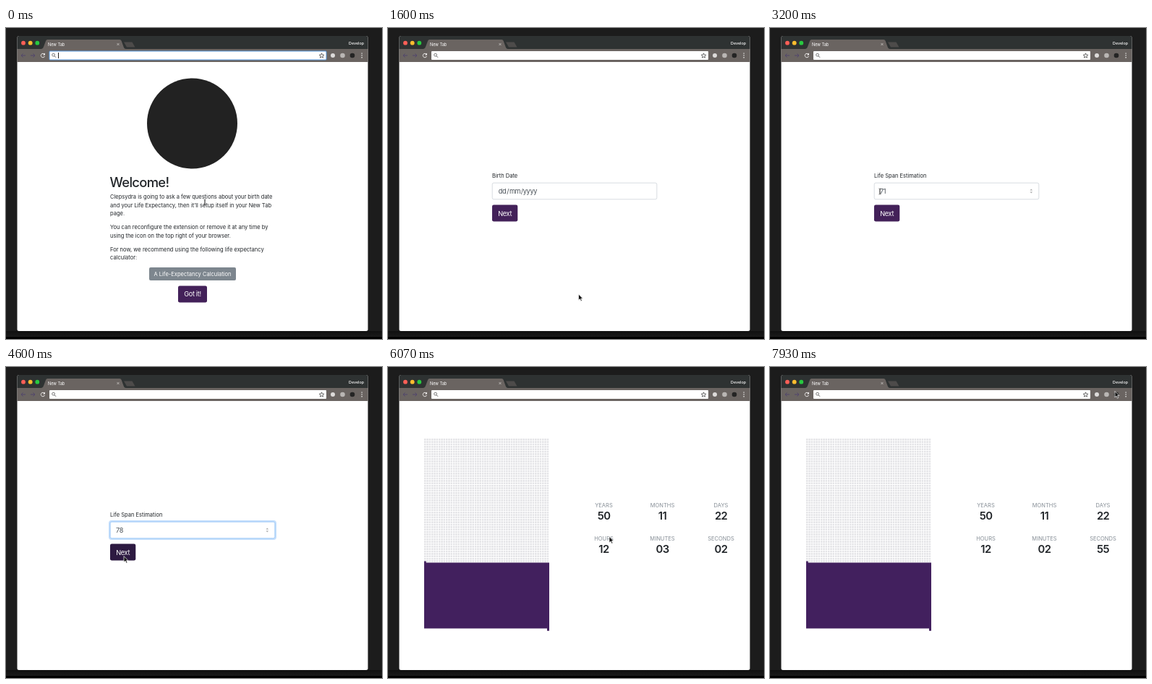
Animation, 520 px wide and 430 px high, one loop 8000 ms. Source, as an HTML page:

```html
<!DOCTYPE html>
<html lang="en">
<head>
<meta charset="utf-8">
<title>New Tab</title>
<style>
html, body { margin: 0; width: 100%; height: 100%; overflow: hidden; background: #1c1c1c; }
svg { display: block; width: 520px; height: 430px; font: 7.54px Inter, "Open Sans", sans-serif; fill: #212529; }
.tiny { font-size: 5.6px; fill: #fff; }
.title { font-size: 18.4px; font-weight: 500; letter-spacing: -.7px; }
.large { font-size: 9.2px; letter-spacing: -.35px; }
.field { fill: #495057; }
.white { fill: #fff; }
.mid { text-anchor: middle; }
.unit { fill: #868e96; }
.count { font-size: 14.8px; font-weight: 600; letter-spacing: -.6px; }
.line { fill: none; stroke-width: 1; }
</style>
</head>
<body>
<svg viewBox="0 0 520 430">
  <defs>
    <linearGradient id="shade" x2="0" y2="1">
      <stop stop-color="#101010"/><stop offset="1" stop-color="#1a1a1a"/>
    </linearGradient>
    <pattern id="cells" x="50" y="99" width="3.327" height="3.365" patternUnits="userSpaceOnUse">
      <rect width="2.5" height="2.5" fill="#e4e4e7"/>
    </pattern>
  </defs>

  <!-- desktop and browser window -->
  <rect width="520" height="430" fill="#1c1c1c"/>
  <rect y="419" width="520" height="8" fill="url(#shade)"/>
  <rect y="427" width="520" height="3" fill="#000"/>
  <rect x="15.5" y="11" width="485" height="408" rx="2.5" fill="#fff"/>
  <path d="M15.5 29V13.500Q15.500 11 18 11H498Q500.500 11 500.500 13.500V29Z" fill="#2e3232"/>
  <path d="M15.500 29H49Q51 29 52 26L55 18Q55.700 16 57.500 16H157Q159 16 159.700 18L163 27Q163.700 29 166 29H500.500V47H15.500Z" fill="#6a6461"/>
  <path d="M163 19.500H174.500L178.500 26.500H167Z" fill="#4d4b4a"/>
  <circle cx="24" cy="20.700" r="2.900" fill="#ff5f57"/>
  <circle cx="33.700" cy="20.700" r="2.900" fill="#ffbd2e"/>
  <circle cx="43.300" cy="20.700" r="2.900" fill="#28c940"/>
  <text class="tiny" x="58" y="24.500">New Tab</text>
  <text class="tiny" x="474" y="22.900" font-weight="500" style="font-size:5.400px">Develop</text>
  <path class="line" d="M153.500 21L156.500 24M156.500 21L153.500 24" stroke="#d5d2d0" style="stroke-width:.7"/>
  <path class="line" d="M27 38H21M23.500 35.500L21 38L23.500 40.500M34 38H40M37.500 35.500L40 38L37.500 40.500" stroke="#50456c"/>
  <path class="line" d="M53 36.200A2.700 2.700 0 1 0 53.500 39" stroke="#f2f0ef"/>
  <path d="M54 34.500V37.500H51Z" fill="#f2f0ef"/>
  <rect id="bar" x="60" y="32" width="383" height="12" rx="1" fill="#fff"/>
  <circle class="line" cx="65.600" cy="37.200" r="1.900" stroke="#555" style="stroke-width:.8"/>
  <path class="line" d="M67 38.700L69 40.700" stroke="#555"/>
  <rect id="caret" x="72" y="34" width="1" height="8" fill="#222"/>
  <path class="line" d="M436.500 34.800L437.400 37L439.800 37.200L438 38.800L438.500 41.200L436.500 39.900L434.500 41.200L435 38.800L433.200 37.200L435.600 37Z" stroke="#444" style="stroke-width:.8"/>
  <circle cx="452" cy="38" r="3" fill="#dcdad9"/>
  <circle cx="465.500" cy="38" r="3.300" fill="#b9b6b4"/>
  <circle cx="479" cy="38" r="3.300" fill="#242424"/>
  <path d="M491.500 34.500h1.300v1.300h-1.300zm0 2.800h1.300v1.300h-1.300zm0 2.800h1.300v1.300h-1.300z" fill="#eee"/>

  <!-- welcome -->
  <g class="page">
    <circle cx="257.500" cy="132" r="62.500" fill="#222"/>
    <text class="title" x="143.500" y="219.800">Welcome!</text>
    <text x="144" y="236.400">Clepsydra is going to ask a few questions about your birth date</text>
    <text x="144" y="247.900">and your Life Expectancy, then it’ll setup itself in your New Tab</text>
    <text x="144" y="259.300">page.</text>
    <text x="144" y="278.200">You can reconfigure the extension or remove it at any time by</text>
    <text x="144" y="289.700">using the icon on the top right of your browser.</text>
    <text x="144" y="308.600">For now, we recommend using the following life expectancy</text>
    <text x="144" y="320.100">calculator:</text>
    <rect id="link" x="198" y="331" width="120" height="18" rx="2"/>
    <text class="white mid" x="258" y="342.700">A Life-Expectancy Calculation</text>
    <rect id="start" x="238" y="356.500" width="40" height="23" rx="2.300"/>
    <text class="large white mid" x="258" y="371.300">Got it!</text>
  </g>

  <!-- questions -->
  <g id="form">
    <text id="label" x="144" y="206.600"></text>
    <rect id="ring" x="143" y="213" width="230" height="25" rx="3" fill="none" stroke="#c3defc" stroke-width="2"/>
    <rect id="box" x="144.200" y="214.200" width="227.600" height="22.600" rx="2" fill="#fff" stroke-width=".8"/>
    <rect id="mark" y="219.500" height="11.500" fill="#add0fb"/>
    <g class="large field page">
      <text id="day" class="mid" x="158" y="229"></text>
      <text x="164.200" y="229">/</text>
      <text id="month" class="mid" x="175.600" y="229"></text>
      <text x="183.700" y="229">/</text>
      <text id="year" x="186.800" y="229"></text>
    </g>
    <g id="clear">
      <circle cx="340.500" cy="225.500" r="3.300" fill="#b4b4b4"/>
      <path class="line" d="M339.300 224.300L341.700 226.700M341.700 224.300L339.300 226.700" stroke="#fff" style="stroke-width:.8"/>
    </g>
    <path id="spin" d="M-2 -1L0 -3.300L2 -1ZM-2 1L0 3.300L2 1Z" fill="#aaa"/>
    <path id="drop" d="M354.500 223H361.300L357.900 228.600Z" fill="#333"/>
    <text id="span" class="large field" x="152" y="229"></text>
    <rect id="next" x="144" y="244.500" width="35.300" height="23" rx="2.300"/>
    <text class="large white mid" x="161.700" y="259.500">Next</text>
  </g>

  <!-- countdown -->
  <g id="clock">
    <rect x="50" y="99" width="173" height="171.600" fill="url(#cells)"/>
    <path d="M50 268.500h2.700v2.100H223V364.800h-3V361.500H50Z" fill="#42205e"/>
  </g>

  <g id="arrow"><path d="M0 0V8.400L2 6.600L3.400 9.700L4.800 9.100L3.500 6.100H6Z" fill="#111" stroke="#fff" stroke-width=".7"/></g>
  <path id="beam" class="line" d="M-1.500 -4Q0 -4 0 -3V3Q0 4 -1.500 4M1.500 -4Q0 -4 0 -3V3Q0 4 1.500 4" stroke="#444" style="stroke-width:.8"/>
</svg>
<script>
const $ = id => document.getElementById(id);
const show = (id, on) => $(id).style.display = on ? '' : 'none';
const set = (id, attrs) => { for (const k in attrs) $(id).setAttribute(k, attrs[k]); };
const [welcome, date] = document.querySelectorAll('.page');
const FPS = 15, LOOP = 8000;

// Times below are in ticks of 1/15 s.
const path = [
  [0, 275, 241], [13, 263.5, 368], [24, 263.5, 368], [31, 152, 226], [63, 152, 226],
  [69, 163, 261.5], [71, 163, 261.5], [73, 152, 353], [75, 152, 353], [78, 306, 234.5],
  [91, 306, 234.5], [94, 57.5, 98], [101, 57.5, 98], [104, 336, 150], [116, 336, 150],
  [119, 477, 33.5], [120, 477, 33.5]
];

function pointer(n) {
  const i = path.findIndex(p => p[0] > n);
  const [n0, x0, y0] = path[i - 1], [n1, x1, y1] = path[i];
  const u = (n - n0) / (n1 - n0), e = u * u * (3 - 2 * u);
  return [x0 + (x1 - x0) * e, y0 + (y1 - y0) * e];
}

const latest = (steps, n) => steps.reduce((v, [at, s]) => n >= at ? s : v, '');

const units = ['YEARS', 'MONTHS', 'DAYS', 'HOURS', 'MINUTES', 'SECONDS'];
const counts = units.map((name, i) => {
  const x = 298.5 + i % 3 * 81, y = i < 3 ? 193.8 : 240.3;
  const add = (cls, dy, s) => {
    const t = document.createElementNS('http://www.w3.org/2000/svg', 'text');
    t.setAttribute('class', 'mid ' + cls);
    t.setAttribute('x', x);
    t.setAttribute('y', y + dy);
    t.textContent = s;
    return $('clock').appendChild(t);
  };
  add('unit', 0, name);
  return add('count', 17, '');
});

function drawForm(n, hover) {
  const birth = n < 48;
  const focus = birth ? n >= 31 : n >= 53;
  const active = focus || !birth;
  $('label').textContent = birth ? 'Birth Date' : 'Life Span Estimation';
  $('ring').style.opacity = focus ? Math.min(1, (n - (birth ? 30 : 52)) / 3) : 0;
  set('box', { stroke: focus ? '#8fc1f7' : '#ced4da' });
  date.style.display = birth ? '' : 'none';
  $('day').textContent = n < 36 ? 'dd' : '28';
  $('month').textContent = n < 37 ? 'mm' : '03';
  $('year').textContent = latest([[0, 'yyyy'], [38, '0001'], [40, '0019'], [41, '0199'], [43, '1990']], n);
  const [x, width] = n < 36 ? [152, 12] : n < 37 ? [167, 17] : [186.3, 21];
  set('mark', { x, width });
  set('month', { style: n === 36 ? 'fill:#111' : '' });
  show('mark', birth && focus);
  show('clear', birth && n >= 36);
  show('drop', birth && focus);
  show('spin', active);
  set('spin', { transform: `translate(${birth ? 348 : 361.3} 225.5) scale(.9)` });
  $('span').textContent = birth ? '' : latest([[0, '71'], [58, '7'], [60, '78']], n);
  set('next', { fill: hover ? '#2d1a41' : '#432159' });
}

function draw(ms) {
  const n = Math.floor((ms % LOOP + 4) * FPS / 1000) % 120;
  const [x, y] = pointer(n);
  const first = n < 24, asking = !first && n < 71;

  welcome.style.display = first ? '' : 'none';
  show('form', asking);
  show('clock', n >= 71);
  show('caret', first && (n + 1) % 8 < 4);
  set('bar', { stroke: first ? '#5b9be0' : 'none' });

  if (first) {
    set('link', { fill: y > 331 && y < 349 ? '#6a7279' : '#7d868e' });
    set('start', { fill: y > 356 ? '#2d1a41' : '#432159' });
  } else if (asking) {
    drawForm(n, x > 144 && x < 179 && y > 244 && y < 268);
  } else {
    const left = 182 - Math.floor((n - 90) / 4);
    [50, 11, 22, 12, Math.floor(left / 60), left % 60].forEach((v, i) =>
      counts[i].textContent = String(v).padStart(2, '0'));
  }

  const text = first ? y < 322 : n >= 48 && n < 64;
  const hidden = n >= 58 && n < 63;
  show('beam', text && !hidden);
  show('arrow', !text && !hidden);
  for (const id of ['beam', 'arrow']) set(id, { transform: `translate(${x} ${y})` });
}

let start;
function loop(now) {
  start ??= now;
  draw(now - start);
  requestAnimationFrame(loop);
}
draw(0);
requestAnimationFrame(loop);
</script>
</body>
</html>
```
